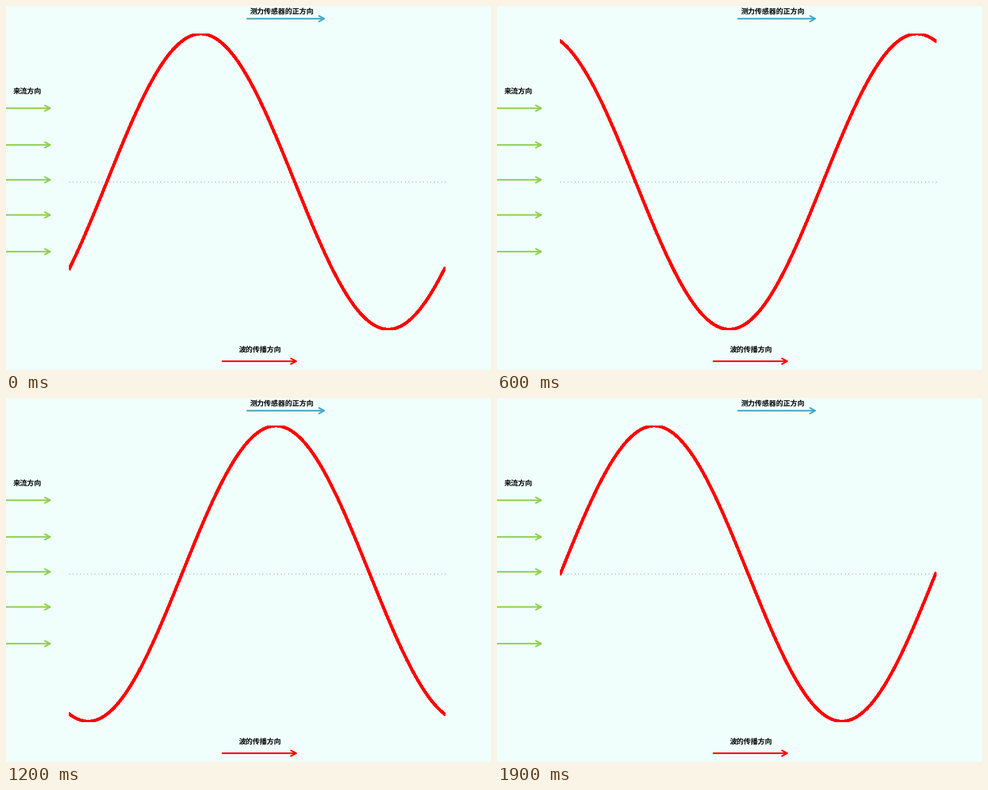
Animation of 864 by 648 pixels, one loop 2100 ms. Source, as a matplotlib script:

```python
import matplotlib.pyplot as plt
import numpy as np
from matplotlib.animation import FuncAnimation
from matplotlib.patches import Rectangle

W, H, DPI = 864, 648, 100
PX = 72 / DPI                     # points per pixel
LEFT, RIGHT, MID, AMP = 113, 781.5, 312.6, 263
STEPS, FRAMES, INTERVAL = 10, 21, 100

plt.rcParams["font.family"] = ["Noto Sans CJK JP", "DejaVu Sans"]
fig = plt.figure(figsize=(W / DPI, H / DPI), dpi=DPI, facecolor="#f0fffc")
ax = fig.add_axes([0, 0, 1, 1])
ax.set(xlim=(0, W), ylim=(H, 0))
ax.axis("off")


def arrow(x0, x1, y, color):
    """Horizontal arrow with an open head."""
    style = dict(color=color, lw=2.8 * PX, solid_joinstyle="round", snap=False)
    ax.plot([x0, x1], [y, y], solid_capstyle="butt", **style)
    ax.plot([x1 - 9.5, x1, x1 - 9.5], [y - 5, y, y + 5],
            solid_capstyle="round", **style)


def label(x, y, text):
    ax.text(x, y, text, size=12.67 * PX, weight="bold", color="black",
            ha="left", va="baseline")


for y in (182, 247.3, 309.4, 372, 437.3):
    arrow(0, 78.7, y, "#92d050")
arrow(428.5, 567, 22.6, "#46aac5")
arrow(384.5, 517, 632.4, "#ff0000")

label(434.7, 13.4, "测力传感器的正方向")
label(13, 155.5, "来流方向")
label(414.7, 615.5, "波的传播方向")

dots = np.arange(112.5, 784, 6.5)
ax.plot(dots, np.full_like(dots, 313.5), ",", color="#555555")

xs = np.linspace(LEFT, RIGHT, 200)
wave, = ax.plot([], [], color="#ff0000", lw=4.6 * PX, antialiased=False,
                solid_capstyle="projecting")
# The plot window trims the crests and both ends of the wave.
wave.set_clip_path(Rectangle((112, 49), 670.5, 528, transform=ax.transData))


def update(i):
    step = min(i, FRAMES - 2) + 1
    turns = (xs - LEFT) / (RIGHT - LEFT) - step / STEPS
    wave.set_data(xs, MID - AMP * np.sin(2 * np.pi * turns))
    return wave,


anim = FuncAnimation(fig, update, frames=FRAMES, interval=INTERVAL,
                     repeat=True, repeat_delay=0)
plt.show()
```
